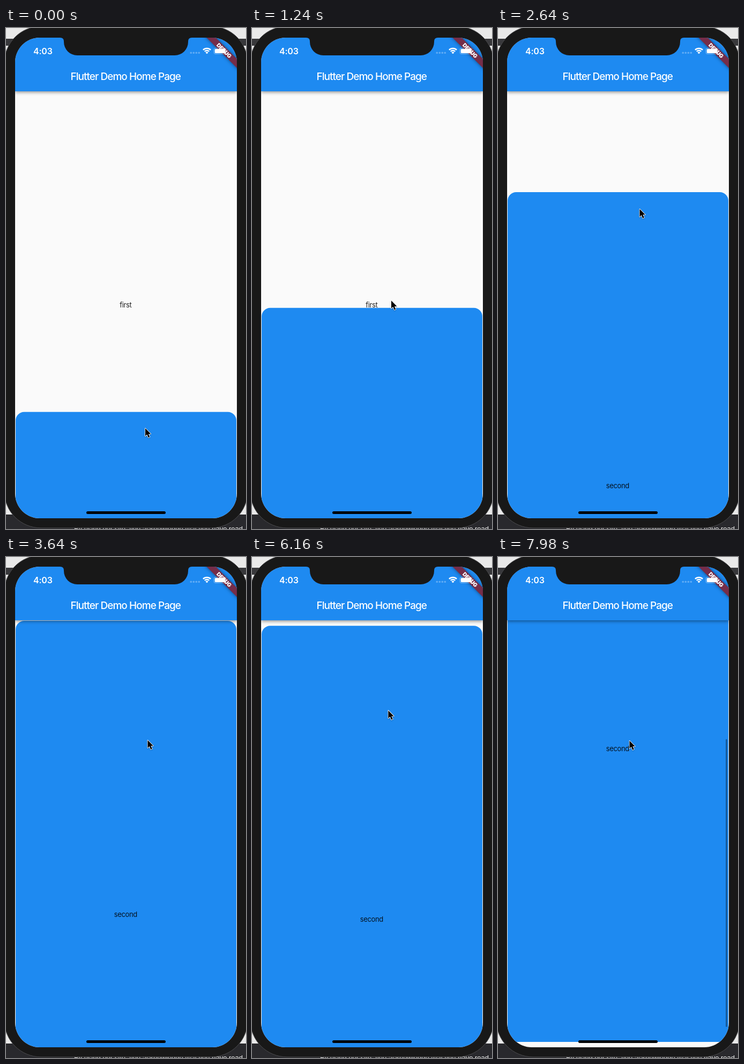
Recreate the animation shown at these times as an HTML page with a canvas. Size 448 by 934 pixels, loop 8 s.

```html
<!DOCTYPE html>
<html lang="en">
<head>
<meta charset="utf-8">
<title>Draggable sheet</title>
<style>
html, body { margin: 0; width: 100%; height: 100%; overflow: hidden; background: #181818; }
canvas { display: block; }
</style>
</head>
<body>
<canvas id="stage" width="448" height="934"></canvas>
<script>
const ctx = document.getElementById('stage').getContext('2d');
const LOOP = 8000;
const BLUE = '#1e8af1';
const BLACK = '#181818';
const SCREEN = { x: 17, y: 18, w: 414, h: 896 };
const BODY_TOP = 118;
const SHEET_HEIGHT = 1094;

// Keys are [time, value, ...].
const sheetKeys = [
  [0, 716], [1240, 522], [1800, 395], [2400, 341], [2640, 306], [3220, 306],
  [3400, 178], [3640, 119], [5200, 119], [5580, 350], [6000, 154], [6300, 119],
  [6840, 119], [7020, -77], [7260, -160], [7580, -180], [7680, -180], [7980, -190]
];
const pointerKeys = [
  [0, 259.5, 746], [1240, 259.5, 508], [1800, 264, 407], [2640, 264, 337],
  [2920, 264, 341], [3800, 264, 341], [4600, 266, 289], [5060, 266, 204],
  [5200, 266, 204], [5580, 262, 436], [6000, 258, 240], [6740, 236, 616],
  [6840, 236, 616], [7020, 236, 419], [7580, 245, 352], [7980, 245, 342]
];

// Monotone cubic interpolation: smooth, without overshoot.
function sample(keys, t, col = 1) {
  const last = keys.length - 1;
  if (t >= keys[last][0]) return keys[last][col];
  let i = 0;
  while (t >= keys[i + 1][0]) i++;
  const slope = k => (keys[k + 1][col] - keys[k][col]) / (keys[k + 1][0] - keys[k][0]);
  const tangent = k => {
    if (k === 0) return slope(0);
    if (k === last) return slope(last - 1);
    const a = slope(k - 1), b = slope(k);
    return a * b <= 0 ? 0 : 2 * a * b / (a + b);
  };
  const span = keys[i + 1][0] - keys[i][0];
  const u = (t - keys[i][0]) / span, v = 1 - u;
  return keys[i][col] * (1 + 2 * u) * v * v + tangent(i) * span * u * v * v
    + keys[i + 1][col] * (3 - 2 * u) * u * u - tangent(i + 1) * span * u * u * v;
}

function rect(x, y, w, h, color) {
  ctx.fillStyle = color;
  ctx.fillRect(x, y, w, h);
}

function rounded(x, y, w, h, r, color) {
  ctx.beginPath();
  ctx.roundRect(x, y, w, h, r);
  ctx.fillStyle = color;
  ctx.fill();
}

function label(text, x, y, font, color, spacing = 0, align = 'center') {
  ctx.font = font;
  ctx.letterSpacing = spacing + 'px';
  ctx.textAlign = align;
  ctx.fillStyle = color;
  ctx.fillText(text, x, y);
}

function drawDesktop() {
  rect(0, 0, 448, 934, '#e9e9e9');
  rect(0, 20, 448, 13, '#38383b');
  rect(0, 907, 448, 27, '#29292d');
  label('By using our site, you acknowledge that you have read', 442, 938,
    '13px "Liberation Sans", sans-serif', '#f2f2f2', 0, 'right');
}

function drawShell() {
  rounded(-3, -3, 454, 935, 68, BLACK);
  ctx.strokeStyle = '#4a4a4c';
  ctx.lineWidth = 1;
  ctx.stroke();
}

function drawSheet(top) {
  rounded(18, top, 412, SHEET_HEIGHT, [16, 16, 0, 0], BLUE);
  label('second', 223.3, top + 551.5, '13px Inter, sans-serif', 'rgba(0,0,0,.87)', -0.4);
}

function drawScrollbar(top, t) {
  const alpha = Math.max(0, Math.min(1, (t - 6840) / 120));
  if (!alpha) return;
  const offset = 119 - top;
  const over = Math.max(0, offset - 298);
  const start = 120 + 214 * Math.min(offset, 298) / 298 + over * 0.5;
  rounded(425, start, 3, 542 - over * 0.5, 1.5, `rgba(0,0,0,${0.35 * alpha})`);
}

function drawAppBar() {
  ctx.save();
  ctx.shadowColor = 'rgba(0,0,0,.42)';
  ctx.shadowBlur = 6;
  ctx.shadowOffsetY = 2;
  rect(SCREEN.x, SCREEN.y, SCREEN.w, BODY_TOP - SCREEN.y, BLUE);
  ctx.restore();
  label('Flutter Demo Home Page', 223.2, 97, '500 19px Inter, sans-serif', '#fff', -0.95);
}

function drawBanner() {
  ctx.save();
  ctx.translate(431, 18);
  ctx.rotate(Math.PI / 4);
  ctx.shadowColor = 'rgba(0,0,0,.5)';
  ctx.shadowBlur = 6;
  rect(-45, 28, 90, 12, '#752d49');
  ctx.shadowColor = 'transparent';
  label('DEBUG', 0, 37.7, '900 10.2px Inter, sans-serif', '#fff', -0.2);
  ctx.restore();
}

function drawStatus() {
  label('4:03', 51, 48.5, '600 16px Inter, sans-serif', '#fff', -0.2, 'left');
  for (let i = 0; i < 4; i++) rounded(343.5 + i * 5, 44.5, 3.6, 3.6, 1.8, 'rgba(255,255,255,.3)');

  ctx.strokeStyle = '#fff';
  ctx.lineWidth = 2.3;
  for (const r of [6, 10]) {
    ctx.beginPath();
    ctx.arc(375, 48, r, -Math.PI * 0.75, -Math.PI * 0.25);
    ctx.stroke();
  }
  ctx.beginPath();
  ctx.moveTo(375, 48.3);
  ctx.arc(375, 48.3, 3.7, -Math.PI * 0.75, -Math.PI * 0.25);
  ctx.fillStyle = '#fff';
  ctx.fill();

  ctx.beginPath();
  ctx.roundRect(388, 37.5, 23, 11, 3);
  ctx.strokeStyle = 'rgba(255,255,255,.4)';
  ctx.lineWidth = 1;
  ctx.stroke();
  rounded(389.7, 39, 19.5, 8, 1.8, '#fff');
  rounded(412.3, 41.3, 1.4, 3.6, 0.7, 'rgba(255,255,255,.45)');
}

function drawNotch() {
  ctx.beginPath();
  ctx.moveTo(101, 17);
  ctx.lineTo(101, 18);
  ctx.quadraticCurveTo(108, 18, 108, 25);
  ctx.arcTo(108, 51, 134, 51, 25);
  ctx.arcTo(340, 51, 340, 25, 25);
  ctx.lineTo(340, 25);
  ctx.quadraticCurveTo(340, 18, 347, 18);
  ctx.lineTo(347, 17);
  ctx.fillStyle = BLACK;
  ctx.fill();
}

function drawPointer(x, y) {
  ctx.save();
  ctx.translate(x, y);
  ctx.beginPath();
  [[0.5, 0.5], [0.5, 15], [3.8, 12], [6.3, 17.7], [8.8, 16.6], [6.4, 11.1], [10.8, 11]]
    .forEach(p => ctx.lineTo(...p));
  ctx.closePath();
  ctx.shadowColor = 'rgba(0,0,0,.3)';
  ctx.shadowBlur = 2;
  ctx.shadowOffsetY = 1;
  ctx.lineJoin = 'round';
  ctx.lineWidth = 1.6;
  ctx.strokeStyle = '#fff';
  ctx.stroke();
  ctx.shadowColor = 'transparent';
  ctx.fillStyle = '#000';
  ctx.fill();
  ctx.restore();
}

function draw(t) {
  const top = sample(sheetKeys, t);
  drawDesktop();
  drawShell();

  ctx.save();
  ctx.beginPath();
  ctx.roundRect(SCREEN.x, SCREEN.y, SCREEN.w, SCREEN.h, 46);
  ctx.clip();
  rect(SCREEN.x, SCREEN.y, SCREEN.w, SCREEN.h, '#fafafa');
  label('first', 223.3, 520.5, '13px Inter, sans-serif', 'rgba(0,0,0,.87)', -0.4);
  drawSheet(top);
  drawScrollbar(top, t);
  drawAppBar();
  drawBanner();
  drawStatus();
  rounded(150, 901, 148, 5, 2.5, '#000');
  ctx.restore();

  drawNotch();
  drawPointer(sample(pointerKeys, t), sample(pointerKeys, t, 2));
}

const began = performance.now();
function tick() {
  draw((performance.now() - began) % LOOP);
  requestAnimationFrame(tick);
}
tick();
</script>
</body>
</html>
```
